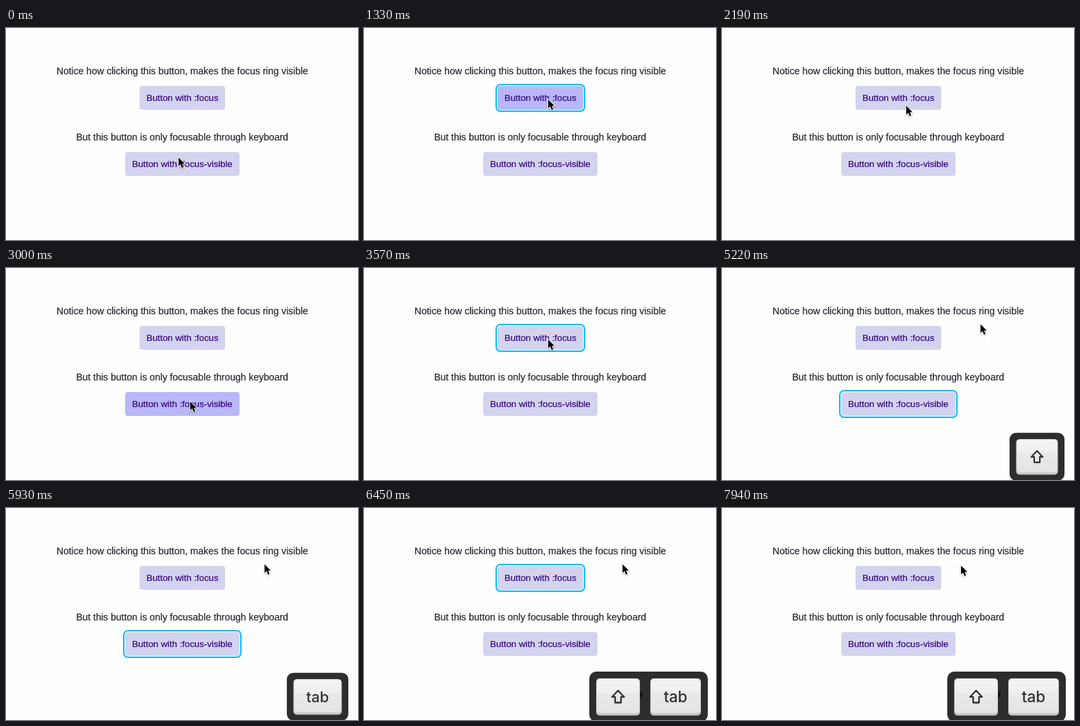
An HTML page for the animation above (8 s loop, 514 by 311 pixels).

```html
<!DOCTYPE html>
<html>
<head>
<meta charset="utf-8">
<style>
  html, body { margin: 0; width: 100%; height: 100%; overflow: hidden; background: #fefefe; }
  svg { display: block; }
  text { font: 14px "Liberation Sans", Arial, sans-serif; fill: #24252f; stroke: #24252f; stroke-width: .2; }
  .label { font-size: 13.333px; fill: #32067a; stroke: #32067a; }
  .ring { fill: none; stroke: #08b9f8; stroke-width: 2; }
  .cap { font: 500 22.5px Inter, "Open Sans", sans-serif; fill: #303030; stroke: none; }
</style>
</head>
<body>
<svg width="514" height="311" viewBox="0 0 514 311">
  <defs>
    <linearGradient id="face" x2="0" y2="1">
      <stop offset="0" stop-color="#f4f4f4"/>
      <stop offset=".4" stop-color="#efefef"/>
      <stop offset=".41" stop-color="#eaeaea"/>
      <stop offset="1" stop-color="#e3e3e3"/>
    </linearGradient>
    <filter id="shadow" x="-50%" y="-50%" width="200%" height="200%">
      <feDropShadow dx="0" dy="1" stdDeviation=".8" flood-opacity=".35"/>
    </filter>
  </defs>

  <text x="73.8" y="68">Notice how clicking this button, makes the focus ring visible</text>
  <rect id="btn1" x="195" y="85" width="125" height="35" rx="4"/>
  <rect id="ring1" class="ring" x="193" y="83" width="129" height="39" rx="6"/>
  <text class="label" x="205" y="107">Button with :focus</text>

  <text x="102.4" y="165">But this button is only focusable through keyboard</text>
  <rect id="btn2" x="174" y="182" width="167" height="35" rx="4"/>
  <rect id="ring2" class="ring" x="172" y="180" width="171" height="39" rx="6"/>
  <text class="label" x="184" y="204">Button with :focus-visible</text>

  <g id="panel">
    <rect id="back" y="240" height="73.5" rx="10" fill="#2d2d2d"/>
    <path id="slash" d="M403 278L406 270" stroke="#000" stroke-width="2"/>
    <g id="shift">
      <rect y="250" width="64" height="54.5" rx="5" fill="#c6c6c6"/>
      <rect x="1" y="250" width="62" height="51" rx="5" fill="url(#face)"/>
      <path d="M32 267.8L40.8 277.2H36.3V285.5H27.7V277.2H23.2Z" fill="none" stroke="#303030" stroke-width="2.3" stroke-linejoin="round"/>
    </g>
    <g id="tab">
      <rect x="418" y="250" width="74" height="54.5" rx="5" fill="#c6c6c6"/>
      <rect x="419" y="250" width="72" height="51" rx="5" fill="url(#face)"/>
      <text class="cap" x="455" y="285" text-anchor="middle">tab</text>
    </g>
  </g>

  <g id="cursor" filter="url(#shadow)">
    <path d="M0 0V14.6L3.3 11.5 5.7 17.2 8.3 16.1 6 10.6H10.4Z" transform="scale(.88)" stroke="#fff" stroke-width="1.8" paint-order="stroke"/>
  </g>
</svg>
<script>
const LOOP = 8000, GLIDE = 250, SETTLE = 100, HOLD = 100, POP = 55, SHIFT_LEAD = 110;
const $ = id => document.getElementById(id);

const start = { x: 252, y: 190 };
const first = { x: 269, y: 105, button: 1 };
const second = { x: 269, y: 196, button: 2 };
const away = { x: 377.5, y: 82.5, button: 0 };

// The pointer glides to each spot, settles, then clicks at the given time.
const visits = [
  [430, { ...first, idle: true }], [1330, first], [1770, second], [2370, first],
  [2940, second], [3370, first], [4040, away], [7760, away], [8240, { x: 300, y: 88 }]
];
// Tab is tapped at these times; after the first, every other one is Shift+Tab.
const taps = [4390, 4750, 5330, 5930, 6390, 6870, 7290];
const isBack = i => i > 0 && i % 2 === 0;

const show = (id, on) => $(id).style.display = on ? "" : "none";
const lastClick = t => visits.findLast(([at, spot]) => at <= t && !spot.idle);
const lastTap = t => taps.findLastIndex(at => at <= t);

function pointer(t) {
  let { x, y } = start;
  for (const [at, spot] of visits) {
    const p = Math.min(1, Math.max(0, (t - at + SETTLE + GLIDE) / GLIDE));
    const eased = 1 - (1 - p) ** 2;
    x += (spot.x - x) * eased;
    y += (spot.y - y) * eased;
  }
  return [x, y];
}

function focusRing(t) {
  const click = lastClick(t), tap = lastTap(t);
  if (tap >= 0 && taps[tap] > click[0]) return tap % 2 ? 2 : 1;
  return click && click[1].button === 1 ? 1 : 0;
}

function drawKeys(t) {
  const tap = lastTap(t), next = tap + 1;
  const shiftAt = taps[next] - SHIFT_LEAD;
  const onlyShift = isBack(next) && t >= shiftAt;
  const visible = onlyShift || tap >= 0;
  show("panel", visible);
  if (!visible) return;

  const both = !onlyShift && isBack(tap);
  const left = both ? 329 : onlyShift ? 418 : 408, width = 502 - left;
  const mid = left + width / 2;
  const scale = t - (onlyShift ? shiftAt : taps[tap]) < POP ? .955 : 1;
  $("back").setAttribute("x", left);
  $("back").setAttribute("width", width);
  $("shift").setAttribute("transform", `translate(${left + 10})`);
  show("shift", both || onlyShift);
  show("tab", !onlyShift);
  show("slash", both);
  $("panel").setAttribute("transform", `translate(${mid} 277) scale(${scale}) translate(${-mid} -277)`);
}

function draw() {
  const t = performance.now() % LOOP;
  const click = lastClick(t), ring = focusRing(t);
  const pressed = click && t - click[0] < HOLD ? click[1].button : 0;
  for (const n of [1, 2]) {
    $("btn" + n).setAttribute("fill", pressed === n ? "#b9b7f8" : "#d4d3ef");
    show("ring" + n, ring === n);
  }
  drawKeys(t);
  $("cursor").setAttribute("transform", `translate(${pointer(t)})`);
  requestAnimationFrame(draw);
}
draw();
</script>
</body>
</html>
```
